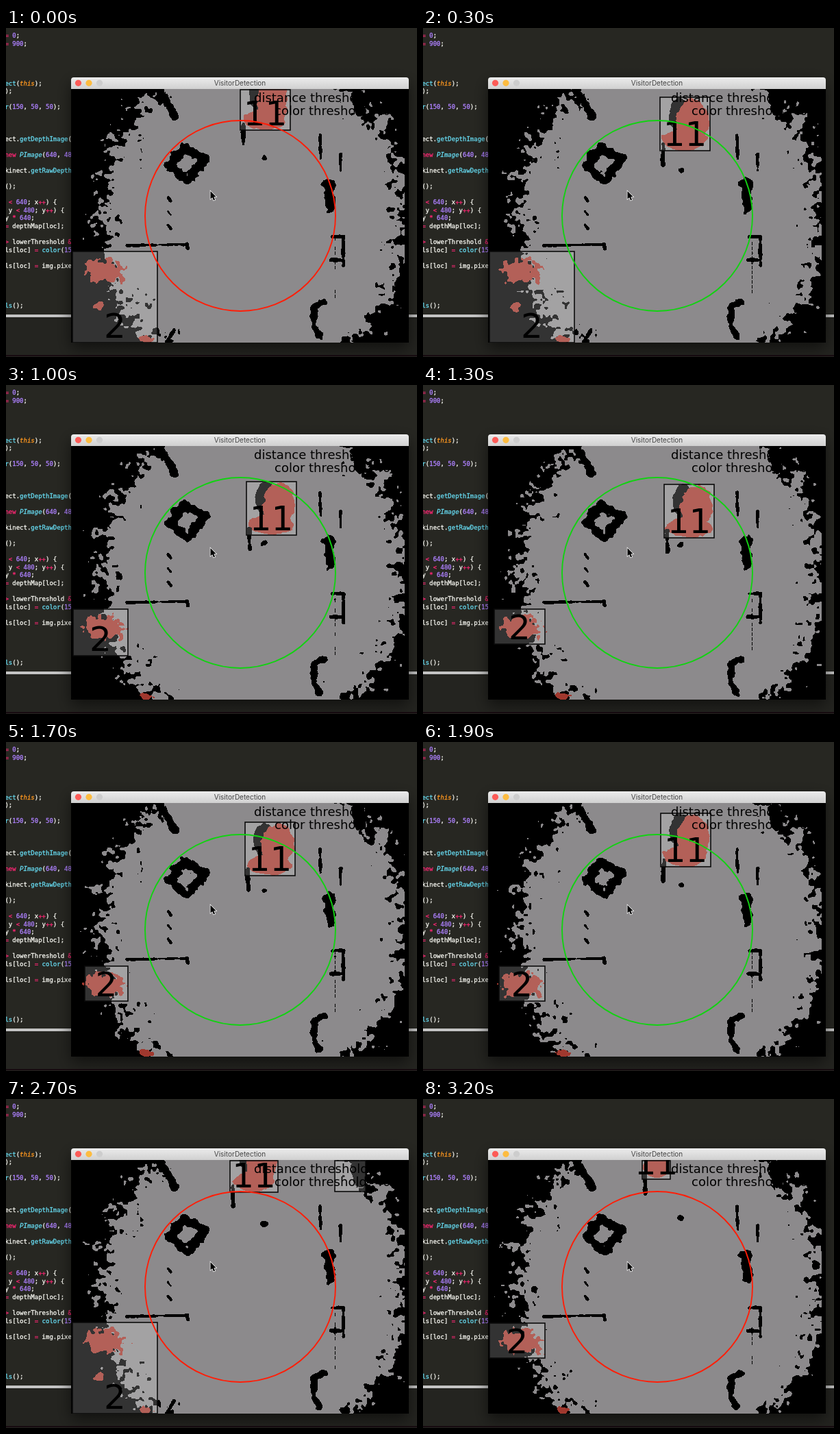
An HTML page with a canvas that plays this animation: 600 px wide and 480 px high, repeating every 3300 ms.

```html
<!DOCTYPE html>
<html lang="en">
<head>
<meta charset="utf-8">
<title>VisitorDetection</title>
<style>
  html, body { margin: 0; width: 100%; height: 100%; overflow: hidden; background: #272722; }
  canvas { display: block; }
</style>
</head>
<body>
<canvas id="stage" width="600" height="480"></canvas>
<script>
const LOOP = 3300, STEP = 100;
const VIEW = { x: 95, y: 89, w: 493, h: 370 };
const ZONE = { x: 342, y: 274, r: 139 };
const GREY = [140, 138, 140], BLACK = [0, 0, 0], RED = [160, 56, 46];

const ctx = document.getElementById('stage').getContext('2d');
const pack = ([r, g, b]) => (255 << 24 | b << 16 | g << 8 | r) >>> 0;
const lerp = (a, b, k) => a + (b - a) * k;
const clamp = v => Math.max(0, Math.min(1, v));

function layer(w, h) {
  const c = document.createElement('canvas');
  c.width = w;
  c.height = h;
  return c;
}

// Seeded noise
function hash(x, y, s) {
  let h = Math.imul(x, 374761393) + Math.imul(y, 668265263) + Math.imul(s + 1, 974634777);
  h = Math.imul(h ^ h >>> 13, 1274126177);
  h = Math.imul(h ^ h >>> 15, 2246822519);
  return ((h ^ h >>> 16) >>> 0) / 4294967296;
}

function smooth(x, y, s) {
  const i = Math.floor(x), j = Math.floor(y);
  let u = x - i, v = y - j;
  u *= u * (3 - 2 * u);
  v *= v * (3 - 2 * v);
  return lerp(lerp(hash(i, j, s), hash(i + 1, j, s), u),
              lerp(hash(i, j + 1, s), hash(i + 1, j + 1, s), u), v) * 2 - 1;
}

// Mostly fixed, with a part that flickers with the seed
const grain = (x, y, seed) =>
  .45 * smooth(x / 14, y / 12, 1) + .38 * smooth(x / 6, y / 6, 2) + .3 * smooth(x / 4, y / 4, seed + 10);

const depth = layer(VIEW.w, VIEW.h);
const depthCtx = depth.getContext('2d');
const image = depthCtx.createImageData(VIEW.w, VIEW.h);
const pixels = new Uint32Array(image.data.buffer);
let seed = 0;

// Colours each pixel of a box where distance plus noise stays below 1
function paint([x0, y0, x1, y1], rough, color, distance) {
  const c = pack(color);
  const right = Math.min(VIEW.x + VIEW.w, x1), bottom = Math.min(VIEW.y + VIEW.h, y1);
  for (let y = Math.max(VIEW.y, Math.floor(y0)); y < bottom; y++) {
    for (let x = Math.max(VIEW.x, Math.floor(x0)); x < right; x++) {
      const room = 1 - distance(x, y);
      if (room > rough || room > -rough && room > rough * grain(x, y, seed)) {
        pixels[(y - VIEW.y) * VIEW.w + x - VIEW.x] = c;
      }
    }
  }
}

function blob(cx, cy, rx, ry, rough, color) {
  const k = 1 + rough;
  paint([cx - rx * k, cy - ry * k, cx + rx * k, cy + ry * k], rough, color,
    (x, y) => Math.hypot((x - cx) / rx, (y - cy) / ry));
}

// Ragged black line of half width w
function trace(w, ...pts) {
  for (let i = 1; i < pts.length; i++) {
    const [ax, ay] = pts[i - 1], [bx, by] = pts[i];
    const dx = bx - ax, dy = by - ay, len = dx * dx + dy * dy, m = 2 * w;
    const box = [Math.min(ax, bx) - m, Math.min(ay, by) - m, Math.max(ax, bx) + m, Math.max(ay, by) + m];
    paint(box, .75, BLACK, (x, y) => {
      const k = clamp(((x - ax) * dx + (y - ay) * dy) / len);
      return Math.hypot(x - ax - k * dx, y - ay - k * dy) / w;
    });
  }
}

function paintRoom() {
  pixels.fill(pack(BLACK));
  paint([VIEW.x, VIEW.y, 582, 459], .22, GREY, (x, y) => Math.hypot((x - 361) / 220, (y - 274) / 239));

  trace(6, [228, 98], [246, 128]);
  trace(8, [512, 98], [516, 122]);
  trace(7, [259, 175], [289, 190], [265, 223], [238, 199], [259, 175]);
  trace(8, [471, 226], [474, 262]);
  trace(5, [464, 400], [450, 406], [449, 434], [457, 448]);
  trace(2.2, [176, 317], [264, 315], [265, 321]);
  trace(2.5, [476, 304], [492, 304], [492, 346]);
  trace(2.5, [474, 338], [490, 338]);
  trace(2.2, [458, 156], [459, 190]);
  trace(2.2, [488, 184], [488, 207]);
  for (let y = 247; y < 300; y += 20) trace(2, [236, y], [240, y + 5]);
  for (let y = 305; y < 395; y += 7) if (hash(y, seed, 5) > .4) trace(.8, [480, y], [480, y + 4]);
}

// Boxes at time t in seconds: the head sinks into the zone, then leaves upwards
function headBox(t) {
  const down = 1 - (1 - clamp(t / 1.3)) ** 2;
  const u = clamp((t - 1.3) / 1.9);
  const up = 1 - (1 - u) ** 1.3;
  const x = 378 + 10 * down - 48 * u * u;
  const y = 149 + 74 * down - 106 * up;
  const half = 36.5 - 16 * u ** 8;
  return [x - half, y - 78, x + half, y].map(Math.round);
}

const isMerged = t => t < .35 || t > 1.95 && t < 2.95;

function handBox(t) {
  if (isMerged(t)) return [97, 326, 221, 459];
  const left = 97 + 18 * Math.exp(-(((t - 1.7) / .4) ** 2));
  return [left, 327, 178, 378 + 33 * clamp((1.3 - t) / .6)].map(Math.round);
}

function paintHead([x0, y0, x1, y1]) {
  const w = x1 - x0, h = y1 - y0;
  const part = (u, v, a, b, c) => blob(x0 + u * w, y0 + v * h, a * w, b * h, .18, c);
  part(.38, .32, .21, .32, BLACK);
  part(.64, .42, .32, .4, RED);
  part(.48, .79, .45, .19, RED);
  trace(3, [x0 + 4, y1 - 10], [x0 + 4, y1 + 20]);
  blob(376, 105 + .57 * y1, 5, 4, .8, BLACK);
}

function paintHand(merged) {
  blob(140, 354, 26, 16, .9, RED);
  blob(203, 454, 9, 5, .8, RED);
  if (!merged) return;
  blob(134, 406, 9, 6, .9, RED);
  trace(2.5, [234, 458], [245, 440]);
}

function drawBox([x0, y0, x1, y1], label) {
  const top = Math.max(90, y0);
  ctx.fillStyle = 'rgba(255,255,255,.2)';
  ctx.fillRect(x0, top, x1 - x0, y1 - top);
  ctx.strokeStyle = '#0a0a0a';
  ctx.lineWidth = 1.6;
  ctx.strokeRect(x0, top, x1 - x0, y1 - top);
  if (!label) return;
  ctx.fillStyle = '#000';
  ctx.font = '50px "DejaVu Sans", sans-serif';
  ctx.textAlign = 'center';
  ctx.fillText(label, (x0 + x1) / 2, y1 - 7);
}

const arrow = new Path2D('M298.5 238v11.5l2.7-2.3 1.9 4.3 2-.9-1.8-4.1 3.4-.2z');

function drawCursor() {
  ctx.lineWidth = 1.5;
  ctx.strokeStyle = '#fff';
  ctx.stroke(arrow);
  ctx.fillStyle = '#000';
  ctx.fill(arrow);
}

// The first column lies left of the stage
const CODE = ` = 0;
 = 900;




 ect(this);
();

or(150, 50, 50);



 ect.getDepthImage();

 new PImage(640, 480

 kinect.getRawDepth(

 ();

x < 640; x++) {
  y < 480; y++) {
 y * 640;
 = depthMap[loc];

 > lowerThreshold &&
els[loc] = color(150

els[loc] = img.pixels




els();`;

function tokenStyle(word, next) {
  if (/^\d/.test(word)) return ['#ae81ff', ''];
  if (/^[=<>*&+]/.test(word) || word === 'new') return ['#f92672', ''];
  if (word === 'this') return ['#fd971f', 'italic '];
  if (/^\w/.test(word) && next === '(') return ['#66d9ef', word === 'PImage' ? 'italic ' : ''];
  return ['#f8f8f2', ''];
}

function drawCode(c) {
  c.lineWidth = .3;
  CODE.split('\n').forEach((line, row) => {
    let x = -7;
    const words = line.match(/\w+|[=<>*&+]+|\s+|./g) || [];
    words.forEach((word, i) => {
      const [color, slant] = tokenStyle(word, words[i + 1]);
      c.font = slant + '9px "DejaVu Sans Mono", monospace';
      c.fillStyle = c.strokeStyle = color;
      c.fillText(word, x, 14.3 + row * 11.57);
      c.strokeText(word, x, 14.3 + row * 11.57);
      x += c.measureText(word).width;
    });
  });
}

function makeBackdrop() {
  const out = layer(600, 480), c = out.getContext('2d');
  const band = (color, y, h) => {
    c.fillStyle = color;
    c.fillRect(0, y, 600, h);
  };
  band('#272722', 0, 480);
  drawCode(c);
  band('#c4c4c4', 418, 4);
  band('#242420', 422, 58);
  band('#170b10', 477, 2);

  const bar = c.createLinearGradient(0, 72, 0, 89);
  bar.addColorStop(0, '#ececec');
  bar.addColorStop(1, '#d0d0d0');
  c.save();
  c.shadowColor = 'rgba(0,0,0,.55)';
  c.shadowBlur = 22;
  c.shadowOffsetY = 8;
  c.fillStyle = bar;
  c.beginPath();
  c.roundRect(95, 72, 493, 387, [4, 4, 0, 0]);
  c.fill();
  c.restore();

  ['#fc5b57', '#fdbc40', '#cdcdcd'].forEach((color, i) => {
    c.beginPath();
    c.arc(105.5 + i * 15.5, 80.3, 4.6, 0, 7);
    c.fillStyle = color;
    c.fill();
  });
  c.fillStyle = '#444';
  c.font = '10px Inter, sans-serif';
  c.textAlign = 'center';
  c.fillText('VisitorDetection', 341.5, 84);
  return out;
}

const backdrop = makeBackdrop();

function draw(step) {
  const t = step * STEP / 1000;
  const head = headBox(t), hand = handBox(t);
  seed = step;
  paintRoom();
  paintHead(head);
  paintHand(isMerged(t));
  depthCtx.putImageData(image, 0, 0);

  ctx.drawImage(backdrop, 0, 0);
  ctx.save();
  ctx.beginPath();
  ctx.rect(VIEW.x, VIEW.y, VIEW.w, VIEW.h);
  ctx.clip();
  ctx.drawImage(depth, VIEW.x, VIEW.y);

  drawBox(head, '11');
  drawBox(hand, '2');
  if (t > 1.95 && t < 2.95) drawBox([480, 90, 525, 135]);

  const inside = (head[1] + head[3]) / 2 > ZONE.y - ZONE.r;
  ctx.beginPath();
  ctx.arc(ZONE.x, ZONE.y, ZONE.r, 0, 2 * Math.PI);
  ctx.lineWidth = 1.9;
  ctx.strokeStyle = inside ? '#12d212' : '#ff1e08';
  ctx.stroke();

  ctx.fillStyle = '#000';
  ctx.font = '18px "DejaVu Sans", sans-serif';
  ctx.textAlign = 'left';
  ctx.fillText('distance threshold: 40', 362, 108);
  ctx.fillText('color threshold: 40', 392, 127);
  drawCursor();
  ctx.restore();
}

const start = performance.now();
let shown = -1;
function tick() {
  const step = Math.floor((performance.now() - start) % LOOP / STEP);
  if (step !== shown) draw(shown = step);
  requestAnimationFrame(tick);
}
tick();
</script>
</body>
</html>
```
